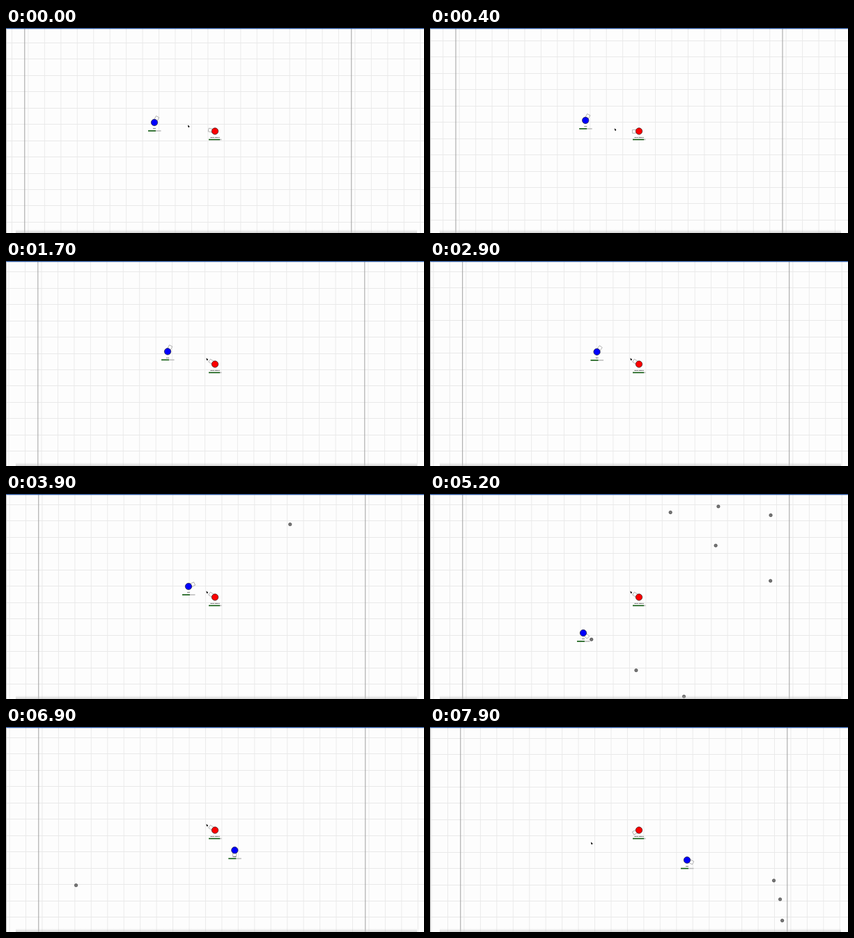
An HTML page with a canvas that plays this animation: 600 by 295 pixels, repeating every 8 s.

```html
<!DOCTYPE html>
<html lang="en">
<head>
<meta charset="utf-8">
<title>Tank arena</title>
<style>
html, body { margin: 0; width: 600px; height: 295px; overflow: hidden; background: #fdfdfd; }
canvas { display: block; }
</style>
</head>
<body>
<canvas id="stage" width="600" height="295"></canvas>
<script>
const ctx = document.getElementById('stage').getContext('2d');
const W = 600, H = 295, LOOP = 8000, STEP = 100;
const CELL = 23.45, WALL = 46.3, RAD = Math.PI / 180;
const SPEED = 0.27, LIFE = 1150, MUZZLE = 12;

// [time, x, y, aim in degrees]; world coordinates match the resting camera.
const blue = [
  [0, 233, 130, -61], [2600, 233, 130, -61], [3900, 262, 133, -25],
  [5200, 220, 200, 42], [6000, 289, 165, 153], [7900, 372, 191, 25]
];
// The pointer, with the aim of the red tank.
const pointer = [
  [0, 261, 139.5, 192], [900, 269.5, 150, 158], [1700, 287.5, 139.5, 214],
  [7300, 287.5, 139.5, 214], [7900, 231, 165.5, 152]
];

// Each fan turns and changes its reach evenly from shot to shot.
const shots = [
  ...fan(3900, 1, -31.5, 0, 171, 0),
  ...fan(5200, 3, -32.2, -11, 318, -52),
  ...fan(5200, 2, -15.6, -17.9, 279, -51),
  ...fan(5200, 3, 32.3, 3, 171, -78),
  ...fan(6000, 2, 5.3, -11.4, 173, 6),
  ...fan(6000, 2, -24.5, -37.7, 190, -43),
  ...fan(6000, 1, -22.7, 0, 135, 0),
  ...fan(6000, 2, 157.4, 1.6, 172, -130),
  ...fan(7900, 3, 13.3, 9.6, 128, 17)
];

function sample(keys, t) {
  const next = keys.findIndex(k => k[0] > t);
  if (next < 0) return keys[keys.length - 1].slice(1);
  const a = keys[next - 1], b = keys[next];
  const p = (t - a[0]) / (b[0] - a[0]);
  return a.slice(1).map((v, i) => v + (b[i + 1] - v) * p);
}

function along([x, y], angle, reach) {
  return [x + reach * Math.cos(angle * RAD), y + reach * Math.sin(angle * RAD)];
}

// Shots leave the moving tank and stand at the given reach around it at `time`.
function fan(time, count, aim, turn, reach, gap) {
  return Array.from({ length: count }, (_, i) => {
    const angle = aim + turn * i, distance = reach + gap * i;
    const age = Math.max(1, (distance - MUZZLE) / SPEED);
    const start = time - age;
    return {
      start, age,
      from: along(sample(blue, start), angle, MUZZLE),
      to: along(sample(blue, time), angle, distance)
    };
  });
}

function camera(t) {
  const lag = Math.exp(-t / 560);
  const push = Math.max(0, (t - 7300) / 600) ** 1.5;
  return [-20 * lag - 3 * push, 6 * lag + 0.5 * push];
}

function rect(color, x, y, w, h) {
  ctx.fillStyle = color;
  ctx.fillRect(x, y, w, h);
}

function disc(x, y, r, fill, stroke) {
  ctx.beginPath();
  ctx.arc(x, y, r, 0, 2 * Math.PI);
  ctx.fillStyle = fill;
  ctx.fill();
  ctx.strokeStyle = stroke;
  ctx.lineWidth = 0.6;
  ctx.stroke();
}

function drawField(cx, cy) {
  rect('#fdfdfd', 0, 0, W, H);
  for (let x = (28 + cx) % CELL; x < W; x += CELL) rect('#ebebeb', x, 0, 1, H);
  for (let y = (15 + cy) % CELL; y < H; y += CELL) rect('#e9e9e9', 0, Math.round(y), W, 1);
  for (const cells of [0, 20]) rect('#a0a0a0', WALL + cells * CELL + cx, 0, 1, H);
}

function drawTank(x, y, aim, color, name, health) {
  ctx.save();
  ctx.translate(x, y);
  ctx.save();
  ctx.rotate(aim * RAD);
  ctx.fillStyle = '#fff';
  ctx.strokeStyle = '#888';
  ctx.lineWidth = 0.6;
  ctx.fillRect(3, -2.4, 6.5, 4.8);
  ctx.strokeRect(3, -2.4, 6.5, 4.8);
  ctx.restore();
  disc(0, 0, 4.7, color, '#111');
  ctx.fillStyle = '#000';
  ctx.font = 'bold 2.4px Arial, "Liberation Sans", sans-serif';
  ctx.textAlign = 'center';
  ctx.fillText(name, 0, 9.4);
  rect('#bbb', -9, 11.3, 18.5, 1.5);
  rect('#0c5c0c', -9, 11.3, 18.5 * health, 1.5);
  ctx.restore();
}

function drawShot({ start, age, from, to }, t, cx, cy) {
  if (t < start || t > start + LIFE) return;
  const p = (t - start) / age;
  const [x, y] = from.map((v, i) => v + (to[i] - v) * p);
  disc(x + cx, y + cy, 2.2, '#777', '#333');
}

function drawPointer(x, y) {
  ctx.fillStyle = '#111';
  ctx.beginPath();
  ctx.moveTo(x, y);
  ctx.lineTo(x + 0.3, y + 3);
  ctx.lineTo(x + 1.8, y + 3.8);
  ctx.lineTo(x + 2.5, y + 2);
  ctx.fill();
}

function drawFrame() {
  rect('#24509a', 0, 0, W, 1.3);
  rect('#bbb', 0, 1, 1, H);
  const shade = ctx.createLinearGradient(0, 290, 0, H);
  shade.addColorStop(0, 'rgba(190,190,190,0)');
  shade.addColorStop(1, 'rgba(190,190,190,.65)');
  rect(shade, 14, 290, 576, 5);
}

function draw(t) {
  const [cx, cy] = camera(t);
  const [bx, by, blueAim] = sample(blue, t);
  const [px, py, redAim] = sample(pointer, t);
  drawField(cx, cy);
  for (const shot of shots) drawShot(shot, t, cx, cy);
  drawTank(300, 148.5, redAim, '#f00', 'Hello World', 0.87);
  drawTank(bx + cx, by + cy, blueAim, '#00f', 'self', 0.59);
  drawPointer(px, py);
  drawFrame();
}

const began = performance.now();
function tick() {
  const t = (performance.now() - began) % LOOP;
  draw(Math.floor(t / STEP) * STEP);
  requestAnimationFrame(tick);
}
tick();
</script>
</body>
</html>
```
